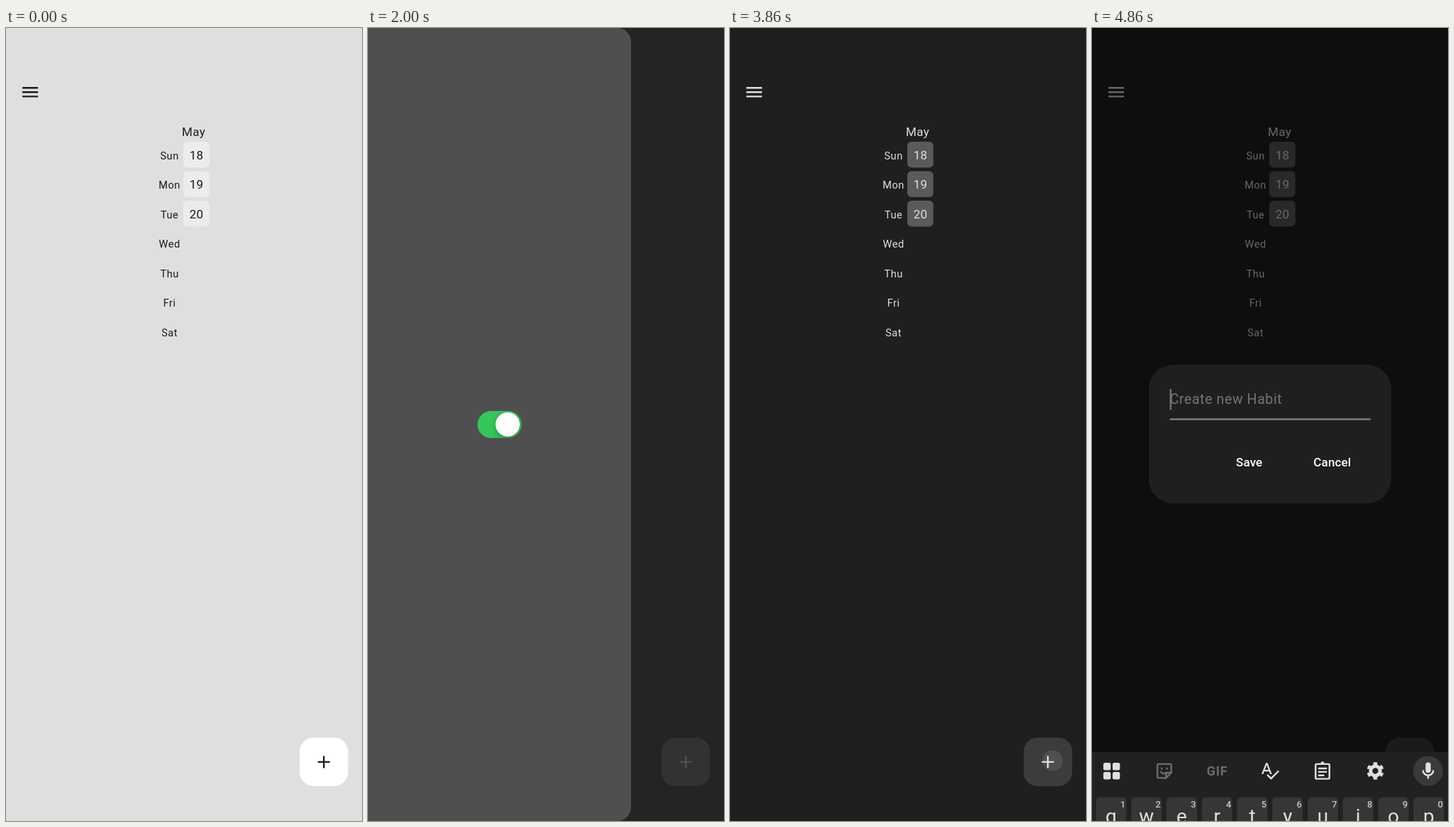
An HTML page for the animation above (5000 ms loop, 502 by 1116 pixels).

```html
<!DOCTYPE html>
<html lang="en">
<head>
<meta charset="utf-8">
<title>Habit calendar</title>
<style>
  html, body { margin: 0; width: 100%; height: 100%; overflow: hidden; background: #dfdfdf; }
  svg { display: block; width: 502px; height: 1116px; font-family: Roboto, sans-serif; }
  text { text-anchor: middle; }
  .bg { fill: var(--bg); }
  .ink { fill: var(--ink); }
  .tile { fill: var(--tile); }
  .fab { fill: var(--fab); }
  .day { font-size: 14.63px; letter-spacing: .49px; }
  .num { font-size: 17.07px; letter-spacing: .3px; }
  .button { font-size: 17.07px; font-weight: 500; letter-spacing: .12px; fill: #fff; }
  .hint { font-size: 19.5px; letter-spacing: .61px; fill: #757575; text-anchor: start; }
  .line { fill: none; stroke: currentColor; stroke-width: 2; }
  #thumb { fill: #fff; filter: drop-shadow(0 3px 4px rgba(0,0,0,.22)) drop-shadow(0 2px 1px rgba(0,0,0,.08)); }
  #keyboard { color: #e0e0e0; fill: #e0e0e0; }
  #keyboard .dim { color: #6c6c6c; fill: #6c6c6c; }
</style>
</head>
<body>
<svg viewBox="0 0 502 1116">
  <clipPath id="track-clip"><rect x="154.4" y="539.1" width="62.2" height="37.8" rx="18.9"/></clipPath>

  <rect class="bg" width="502" height="1116"/>
  <path class="ink" d="M23.1 83h22v2.4h-22zM23.1 89.1h22v2.4h-22zM23.1 95.2h22v2.4h-22z"/>
  <text class="ink num" x="264.6" y="151.8">May</text>
  <g id="days"></g>
  <rect class="fab" x="414.1" y="998.7" width="68.3" height="68.3" rx="19.5"/>
  <circle id="ripple" fill="#fff" opacity=".1"/>
  <path class="ink" d="M439.7 1031.7h7.3v-7.3h2.4v7.3h7.3v2.4h-7.3v7.3h-2.4v-7.3h-7.3z"/>

  <rect id="scrim" width="502" height="1116"/>

  <g id="drawer">
    <rect class="bg" x="-40" width="411" height="1116" rx="19.5"/>
    <g clip-path="url(#track-clip)">
      <rect id="track" x="154" y="539" width="63" height="38"/>
      <circle id="thumb" cy="558" r="17.1"/>
    </g>
  </g>

  <g id="dialog">
    <rect x="80" y="474" width="342" height="195" rx="34" fill="#1f1f1f"/>
    <text class="hint" x="109.7" y="528.5">Create new Habit</text>
    <rect id="underline" x="109.7" width="283"/>
    <rect id="caret" x="109.7" y="508" width="2.4" height="29.3" fill="#757575"/>
    <text class="button" x="221.7" y="616.8">Save</text>
    <text class="button" x="338.8" y="616.8">Cancel</text>
  </g>

  <g id="keyboard">
    <rect y="1019" width="502" height="97" fill="#212121"/>
    <path d="M18 1034h7q2 0 2 2v9h-11v-9q0-2 2-2zM30 1034h7q2 0 2 2v9h-10v-9q0-2 1-2z" display="none"/>
    <g id="grid"></g>
    <g class="dim" transform="translate(87.4 1031) scale(1.22)">
      <path class="line" d="M14 20H5q-1 0-1-1V5q0-1 1-1h14q1 0 1 1v9l-6 6v-5q0-1 1-1h5M7.5 12.5q3.5 4.5 7 1"/>
      <circle cx="9" cy="9" r="1.3"/><circle cx="15" cy="9" r="1.3"/>
    </g>
    <text class="dim" x="176.6" y="1052" font-size="18" font-weight="700" letter-spacing=".8">GIF</text>
    <path transform="translate(236 1030.5) scale(1.22)" d="M12.45 16h2.09L9.43 3H7.57L2.46 16h2.09l1.12-3h5.64l1.14 3zm-6.02-5L8.5 5.48 10.57 11H6.43zm15.16.59l-8.09 8.09L9.83 16l-1.41 1.41 5.09 5.09L23 13z"/>
    <g transform="translate(310.4 1031) scale(1.22)">
      <path class="line" d="M5 4h14q1 0 1 1v15q0 1-1 1H5q-1 0-1-1V5q0-1 1-1zM7 9h10M7 13h10M7 17h7"/>
      <path d="M8 5V3h2a2 2 0 0 1 4 0h2v2z"/>
    </g>
    <g transform="translate(399.5 1045.5) rotate(30)" fill="none" stroke="currentColor">
      <circle r="6.7" stroke-width="5"/>
      <circle r="10.2" stroke-width="4" pathLength="12" stroke-dasharray="1 1" stroke-dashoffset=".5"/>
    </g>
    <circle cx="474" cy="1045.5" r="21" fill="#3a3a3a"/>
    <g transform="translate(459.4 1031) scale(1.22)">
      <rect x="9" y="2" width="6" height="12" rx="3"/>
      <path class="line" d="M6 11a6 6 0 0 0 12 0M12 17v4"/>
    </g>
    <g id="keys"></g>
  </g>
</svg>
<script>
const $ = id => document.getElementById(id);
const set = (id, attrs) => { for (const k in attrs) $(id).setAttribute(k, attrs[k]); };
const show = (id, on) => set(id, { display: on ? 'inline' : 'none' });

$('days').innerHTML = ['Sun', 'Mon', 'Tue', 'Wed', 'Thu', 'Fri', 'Sat'].map((day, i) => {
  const y = 41.5 * i;
  const tile = i > 2 ? '' :
    `<rect class="tile" x="250" y="${160 + y}" width="36.8" height="36.6" rx="6"/>
     <text class="ink num" x="268.6" y="${184.8 + y}">${18 + i}</text>`;
  return `<text class="ink day" x="230.6" y="${184.8 + y}">${day}</text>${tile}`;
}).join('');

$('grid').innerHTML = [0, 1, 2, 3].map(i =>
  `<rect x="${16 + i % 2 * 13}" y="${1034 + (i >> 1) * 13}" width="10.4" height="10.4" rx="2.5"/>`).join('');

$('keys').innerHTML = [...'qwertyuiop'].map((key, i) => {
  const x = 49.75 * i;
  return `<rect x="${5.5 + x}" y="1082.5" width="43" height="60" rx="6" fill="#363636"/>
    <text x="${27 + x}" y="1119" font-size="28">${key}</text>
    <text x="${43.5 + x}" y="1097" font-size="13" font-weight="500" fill="#c8c8c8">${(i + 1) % 10}</text>`;
}).join('');

const DRAWER = 371, LOOP = 5000;
// Light and dark grey levels of each theme colour.
const theme = { bg: [223, 31], ink: [28, 223], tile: [236, 90], fab: [255, 60] };

const steps = [
  { at: 0 },
  { at: 1000, open: 249 },
  { at: 1140, open: 359 },
  { at: 1290, open: DRAWER },
  { at: 2000, open: DRAWER, dark: .75 },
  { at: 2140, open: DRAWER, dark: 1 },
  { at: 2570, open: 185, dark: 1 },
  { at: 2710, dark: 1 },
  { at: 3710, dark: 1, ripple: [459, 1026.5, 1] },
  { at: 3860, dark: 1, ripple: [455, 1031, 14.5] },
  { at: 4000, dark: 1, dialog: true },
  { at: 4710, dark: 1, dialog: true, focus: true },
  { at: 4860, dark: 1, dialog: true, focus: true, keys: true }
];

function draw({ open = 0, dark = 0, ripple = [0, 0, 0], dialog, focus, keys }) {
  for (const name in theme) {
    const [a, b] = theme[name], v = Math.round(a + (b - a) * dark);
    document.documentElement.style.setProperty('--' + name, `rgb(${v},${v},${v})`);
  }
  set('scrim', { opacity: .54 * (dialog ? 1 : open / DRAWER) });
  show('drawer', open);
  set('drawer', { transform: `translate(${open - DRAWER} 0)` });
  set('track', { fill: dark ? '#34c759' : 'rgba(120,120,128,.16)' });
  set('thumb', { cx: dark ? 196.9 : 173.5 });
  set('ripple', { cx: ripple[0], cy: ripple[1], r: ripple[2] });
  show('dialog', dialog);
  show('caret', focus);
  set('underline', focus ? { y: 549.4, height: 2.4, fill: '#808080' } : { y: 550.5, height: 1.3, fill: '#e6e6e6' });
  show('keyboard', keys);
}

let current;
function tick() {
  const t = performance.now() % LOOP;
  const step = steps.findLast(s => s.at <= t);
  if (step !== current) draw(current = step);
  requestAnimationFrame(tick);
}
tick();
</script>
</body>
</html>
```
